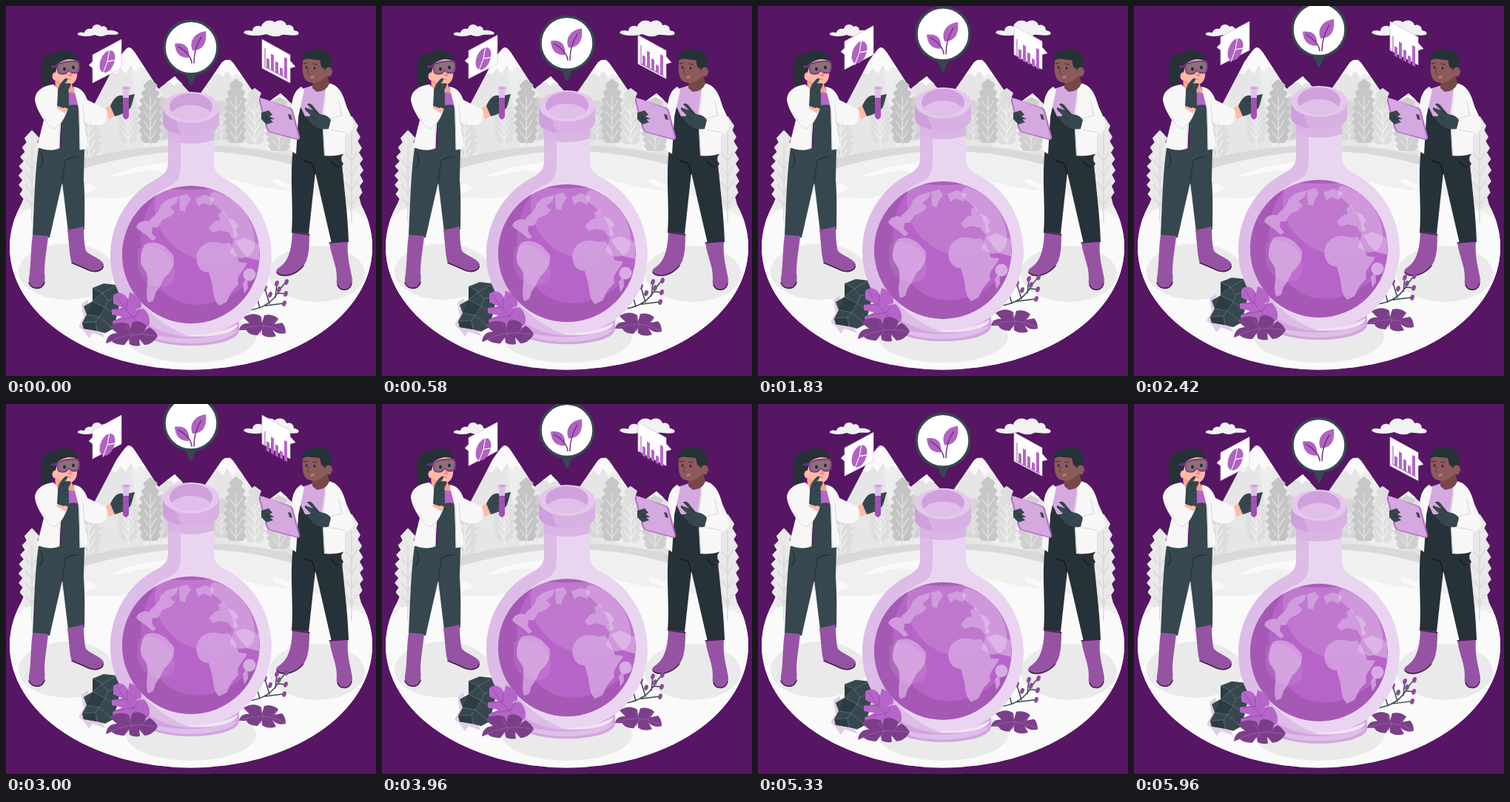
Write an HTML page that moves like this. It is 500 by 500 pixels and loops after 6000 ms.

```html
<!DOCTYPE html>
<html lang="en">
<head>
<meta charset="utf-8">
<title>Green laboratory</title>
<style>
html, body { margin: 0; width: 100%; height: 100%; overflow: hidden; background: #561664; }
svg { display: block; width: 100vw; height: 100vh; }
.round { stroke-linecap: round; stroke-linejoin: round; }
.line { fill: none; stroke-linecap: round; stroke-linejoin: round; }
</style>
</head>
<body>
<svg viewBox="0 0 500 500">
  <defs>
    <clipPath id="ball"><circle cx="250" cy="336" r="93"/></clipPath>
    <clipPath id="mouth"><ellipse cx="250" cy="136" rx="29" ry="18"/></clipPath>
    <clipPath id="floorClip"><ellipse cx="250" cy="326" rx="245" ry="165.500"/></clipPath>
  </defs>

  <g id="clouds" fill="#f2f2f2">
    <path d="M97 39C96 35 102 35 106 36C107 31 112 30 116 31C117 24 126 23 129 28C133 26 137 29 137 33C143 32 151 34 152 37C150 40 141 38 136 39C130 42 124 41 120 39C112 42 101 41 97 39Z"/>
    <path d="M321 36C323 32 329 33 333 34C333 28 340 25 345 28C347 20 357 17 363 22C369 17 378 20 379 26C385 24 389 28 389 33C394 33 398 37 394 39C386 41 379 38 373 39C367 43 358 41 352 38C342 41 326 41 321 36Z"/>
  </g>

  <ellipse cx="250" cy="326" rx="245" ry="165.500" fill="#f1f1f1"/>
  <g id="mountains">
    <path d="M206 210V112L228 95L264 134V210ZM340 210V140L371 118L405 150V210Z" fill="#e3e3e3"/>
    <path d="M84 200L149 76Q163 55 166 56Q170 56 178 69L232 152V200Z" fill="#e6e6e6"/>
    <path d="M168 57Q171 57 178 69L232 152V200H187L180 145L172 110Z" fill="#ededed"/>
    <path d="M240 200L260 122L292 76Q300 69 307 77L356 148L370 200Z" fill="#e6e6e6"/>
    <path d="M302 72L307 77L356 148L370 200H318L307 125Z" fill="#ededed"/>
    <g fill="#fafafa">
      <path d="M142 90L149 76Q163 55 166 56Q170 56 178 69L189 86L180 83L176 90L168 80L162 92L155 84L149 92Z"/>
      <path d="M279 95L292 76Q300 69 307 77L320 96L311 91L306 97L299 87L293 96L287 90Z"/>
      <path d="M216 104L228 95L239 106L232 104L227 108L222 103ZM360 126L371 118L381 127L374 125L370 129L365 125Z"/>
    </g>
  </g>
  <g id="trees"></g>
  <g clip-path="url(#floorClip)">
    <path d="M20 238Q100 196 220 189H288Q390 192 482 240V300H20Z" fill="#d9d9d9"/>
    <path d="M10 262Q90 211 220 197H284Q395 204 490 258V320H10Z" fill="#f0f0f0"/>
    <path d="M-10 290C28 292 20 266 60 262C88 244 118 240 150 226Q180 214 220 211H282Q340 220 392 246C440 262 468 282 510 292V500H35Q25 410 -10 340Z" fill="#fafafa"/>
    <path d="M108 240C130 226 154 233 175 225C193 219 212 224 221 228V242C190 241 180 255 158 258C140 263 112 255 104 263C91 253 145 248 108 240ZM281 211C315 208 370 218 393 229C356 230 346 239 387 248C356 251 330 239 302 234L281 229Z" fill="#f0f0f0"/>
  </g>
  <g fill="#eaeaea">
    <ellipse cx="82" cy="359" rx="65" ry="38"/>
    <ellipse cx="420" cy="362" rx="65" ry="38"/>
    <ellipse cx="250" cy="447" rx="88" ry="35"/>
  </g>
  <g id="sideTrees"></g>

  <g id="leftScientist">
    <path d="M65 64C50 62 46 76 47 92C48 104 49 111 54 117C60 109 61 100 61 88Z" fill="#263238"/>
    <path d="M66 92L67 118L88 133L95 120L88 104Z" fill="#f4a391"/>
    <path d="M72 118L84 116L98 119L100 140H72Z" fill="#b565c8"/>
    <path d="M44 192H106L105 235C107 260 106 285 106 302L84 305L76 238L59 313L36 311C38 270 39 225 44 192Z" fill="#37474f"/>
    <path d="M74 195L76 138C84 133 92 133 97 134L104 197Z" fill="#37474f"/>
    <path class="line" d="M97 204Q86 204 80 209L76 240M47 199Q53 211 45 219" stroke="#263238" stroke-width="1.3"/>
    <path d="M36 309L57 311C55 330 52 345 52 360C54 373 50 382 42 382C33 382 30 376 31 368C34 350 33 330 36 309Z" fill="#9653a3"/>
    <path d="M83 303L105 298C105 312 106 325 108 331C116 339 129 341 132 349C133 357 122 361 112 357L90 348C86 345 86 325 83 303Z" fill="#9653a3"/>
    <path class="line" d="M31 374C34 383 49 385 52 373M89 347L112 357C121 361 131 357 131 352" stroke="#442048" stroke-width="1.6"/>
    <path d="M64 106C48 108 39 116 39 127C41 139 47 147 51 154L42 190C53 196 66 196 72 192L75 148L69 111Z" fill="#f7f7f7"/>
    <path d="M91 109C101 110 107 118 110 127L137 140L135 157C126 164 114 161 105 157L111 189C108 194 103 195 100 194L98 137Z" fill="#f7f7f7"/>
    <path class="line" d="M50 126Q54 145 64 155M73 139L72 192M104 134L106 158M99 135L100 194" stroke="#dcdcdc" stroke-width="1.2"/>
    <path d="M51 120C47 135 52 154 65 166C75 161 79 151 83 141L70 134L64 143Z" fill="#f7f7f7"/>
    <path class="line" d="M51 149C55 160 59 164 65 166Q76 159 82 143" stroke="#d8d8d8"/>
    <path d="M71 133L84 139L80 145L68 138Z" fill="#ffb9a6"/>
    <path d="M59 79C58 64 70 58 82 60C93 62 98 68 98 77L82 82L74 100C64 100 59 91 59 79Z" fill="#263238"/>
    <path d="M70 78Q85 68 97 75L96 94C95 104 88 108 80 106C73 104 68 100 66 93Z" fill="#ffb9a6"/>
    <ellipse cx="67" cy="95" rx="4.500" ry="5.500" fill="#ffb9a6"/>
    <path d="M61 81L71 79L71 83L61 84Z" fill="#6a3177"/>
    <path d="M71 78Q84 73 97 75Q100 79 98 88Q94 92 89 90L85 87L81 91Q74 93 71 90Q68 82 71 78Z" fill="#8f6f7a" stroke="#7d3c8c" stroke-width="2"/>
    <g fill="#263238"><ellipse cx="79" cy="85" rx="2" ry="2.500"/><ellipse cx="91" cy="83" rx="2" ry="2.500"/></g>
    <path class="line" d="M86 88L88 94L84 94M84 99L87 99" stroke="#d56c68" stroke-width="1.2"/>
    <path d="M69 135L70 118C70 109 74 103 80 98C84 96 85 99 79 105L87 105C89 109 82 112 85 119L85 134L78 138Z" fill="#37474f"/>
    <path class="line" d="M74 114L80 105L87 105M79 118L84 114" stroke="#263238"/>
    <path d="M135 138L144 133L149 147L139 153Z" fill="#ffb9a6"/>
    <path d="M141 135C146 123 153 118 160 122L174 119L172 126L169 136C166 143 153 148 147 149Z" fill="#37474f"/>
    <path d="M157 111H168L166 117V150Q162 157 158 150V117Z" fill="#dfbdea"/>
    <path d="M158 124H166V150Q162 156 158 150Z" fill="#a14fb3"/>
    <ellipse cx="162.500" cy="111" rx="6" ry="2.500" fill="#d3a3df" stroke="#eddaf2"/>
    <path class="line" d="M150 130L157 127M151 135L157 134M166 132L170 130" stroke="#263238"/>
  </g>

  <g id="rightScientist">
    <path d="M400 112L419 106L436 108L431 150H395Z" fill="#d4a9df"/>
    <path d="M388 192H452C456 240 462 280 463 319L440 321L418 225L409 308L386 306C389 270 383 235 388 192Z" fill="#263238"/>
    <path d="M395 146L398 136L404 149L425 150L431 141L432 202H391Z" fill="#263238"/>
    <path class="line" d="M403 209L414 213L418 227M440 209Q443 216 449 218" stroke="#11191d" stroke-width="1.4"/>
    <path d="M387 305L410 308C410 325 409 340 404 348C398 359 385 367 375 365C366 365 363 359 367 355C379 348 386 335 387 305Z" fill="#9653a3"/>
    <path d="M437 320L462 318C460 340 466 355 468 370C468 380 462 384 456 384C448 384 446 376 447 368C447 350 440 340 437 320Z" fill="#9653a3"/>
    <path class="line" d="M366 360C372 367 391 365 402 351M448 377C452 386 464 386 467 375M387 306L410 309M437 320L462 318" stroke="#442048" stroke-width="1.4"/>
    <path d="M399 109C388 115 385 130 386 147L384 195L392 200L395 150L403 113Z" fill="#f7f7f7"/>
    <path d="M433 104C448 105 455 116 460 135C465 147 472 158 468 167L459 174L460 198Q447 204 430 202L427 148Z" fill="#f7f7f7"/>
    <path class="line" d="M432 120L428 153L431 202M450 129L454 148L438 152M439 167L460 171M459 174V198" stroke="#d9d9d9" stroke-width="1.2"/>
    <path d="M414 98L433 88L437 105Q432 116 420 116L414 111Z" fill="#754747"/>
    <path d="M402 70C399 84 401 99 408 102C419 107 430 101 434 91L432 72L416 66Z" fill="#8d5a5b"/>
    <path d="M400 74C397 63 411 57 424 58C439 60 443 74 438 84L434 94L430 85L426 82L424 73C414 73 408 69 400 74Z" fill="#263238"/>
    <ellipse cx="436" cy="89" rx="5" ry="6.500" fill="#8d5a5b"/>
    <g fill="#263238"><ellipse cx="406" cy="83" rx="1.300" ry="2"/><ellipse cx="417" cy="84" rx="1.400" ry="2"/></g>
    <path class="line" d="M402 78L407 77M415 78L420 79" stroke="#263238" stroke-width="1.2"/>
    <path class="line" d="M409 84L407 91L411 92" stroke="#693e40"/>
    <path d="M411 96L417 94Q416 98 412 98Z" fill="#d57b7f"/>
    <path d="M344 124Q341 125 342 129L352 166Q353 170 357 171L394 181Q398 181 397 176L388 142Q387 138 383 137Z" fill="#b66ac7"/>
    <path d="M347 125Q343 124 344 129L354 166Q355 169 358 170L392 179Q396 180 395 176L386 143Q385 139 382 138Z" fill="#d4a9df"/>
    <path d="M381 146L385 147L387 154L383 153Z" fill="#37474f"/>
    <path d="M345 144L355 141L360 147L356 149L363 153L357 153L361 157L352 160L345 153Z" fill="#37474f"/>
    <path d="M404 137L415 141L407 133Q410 130 414 134L424 146Q435 147 439 154L436 166Q423 168 414 160L406 150L412 148L404 140Z" fill="#37474f"/>
    <path class="line" d="M415 141L424 147M412 148L419 152M348 148L355 150M348 152L357 153" stroke="#263238"/>
  </g>

  <g id="badges">
    <path d="M242 90H258L252 105Q250 109 248 105Z" fill="#37474f"/>
    <circle cx="250" cy="56" r="36" fill="#fff" stroke="#37474f" stroke-width="3.500"/>
    <path d="M117 66L156 45V84L117 104V84L112 80L117 75Z" fill="#fff" stroke="#d8b4e2" stroke-width=".7"/>
    <path d="M346 45L384 66V74L391 82L384 84V104L346 84Z" fill="#fff" stroke="#d8b4e2" stroke-width=".7"/>
  </g>
  <g id="symbols">
    <path d="M228 51C240 49 249 54 247 70C234 70 229 63 228 51ZM270 34C272 50 266 60 252 60C247 47 255 36 270 34Z" fill="#b063c1"/>
    <path class="line" d="M233 55Q250 65 251 77M264 42Q254 57 254 77" stroke="#71347f" stroke-width="1.5"/>
    <g transform="matrix(1 -.53 0 1 137 75)">
      <ellipse rx="10.500" ry="14" fill="#b063c1"/>
      <path class="line" d="M0 0L3 -15M0 0L11 4M0 0L-6 13" stroke="#fff" stroke-width="1.2"/>
    </g>
    <g transform="matrix(1 .53 0 1 346 45)">
      <path class="line" d="M4 10V35H35" stroke="#6b2d7a" stroke-width=".8"/>
      <path d="M6 35V22H10V35ZM12 35V13H16V35ZM18 35V20H22V35ZM24 35V25H28V35ZM30 35V8H34V35Z" fill="#b565c8"/>
    </g>
  </g>

  <g id="floating">
    <g id="branch">
      <path class="line" d="M329 411Q358 407 370 383L379 372M364 394L366 376M356 402L350 382M350 405L374 402M343 408L339 394M367 388L379 389" stroke="#37474f" stroke-width="1.500"/>
      <g id="buds" fill="#8c4a99"></g>
    </g>
    <path d="M102 403L110 397L116 414L134 448L117 442L112 449L105 439L98 433L105 421Z" fill="#dfcde6"/>
    <g id="rock">
      <path d="M117 381L132 375L150 377L156 392L150 418L145 436L134 442L123 439L105 436L103 428L109 417L105 406L117 399Z" fill="#37474f"/>
      <path d="M117 381L130 388L117 399ZM117 399L134 408L126 420L109 417ZM103 428L121 427L123 439L105 436Z" fill="#2d3b43"/>
      <path class="line" d="M117 381L130 388L150 377M130 388L138 398L156 392M130 388L117 399L134 408L138 398M109 417L126 420L134 408L150 418M103 428L121 427L126 420L132 425L145 436M121 427L123 439" stroke="#72828a" stroke-width=".6"/>
    </g>

    <g id="flask">
      <path d="M219 162V212C219 227 208 231 196 238C164 257 141 295 141 338C141 374 159 407 185 426V438C185 451 216 459 250 459S315 451 315 438V426C341 407 359 374 359 338C359 295 336 257 304 238C292 231 281 227 281 212V162Z" fill="#e9d5ef"/>
      <path d="M219 162V212C219 227 208 231 196 238C164 257 141 295 141 338C141 400 190 447 250 447C205 432 160 390 158 338C158 295 190 256 224 242C233 237 236 229 236 214V162Z" fill="#ddbce7"/>
      <path d="M185 426Q217 447 250 447T315 426V438C315 451 284 459 250 459S185 451 185 438Z" fill="#d3a4df"/>
      <path d="M188 441Q250 459 313 438Q302 454 250 456Q204 455 188 441Z" fill="#dfbfe9"/>
      <path d="M245 444Q282 446 313 430Q312 442 276 446Q257 448 245 444Z" fill="#f2e4f6"/>
      <path d="M219 169H281V181Q250 191 219 181Z" fill="#d9b4e4"/>
      <path d="M212 137V157C212 169 229 175 250 175S288 169 288 157V137Z" fill="#d9b0e3"/>
      <path d="M236 173Q212 169 212 157V137L228 151Z" fill="#d09fdd"/>
      <ellipse cx="250" cy="137" rx="38" ry="21" fill="#e4c8ec"/>
      <ellipse cx="250" cy="136" rx="29" ry="18" fill="#d0a0dc"/>
      <ellipse cx="250" cy="151" rx="29" ry="17" fill="#e0bfe9" clip-path="url(#mouth)"/>
    </g>

    <g id="globe" clip-path="url(#ball)">
      <circle cx="250" cy="336" r="93" fill="#b764c8"/>
      <path d="M157 243H215C175 278 170 345 210 384C244 417 297 408 342 360V430H157Z" fill="#a559b5"/>
      <ellipse cx="287" cy="271" rx="86" ry="75" fill="#fff" opacity=".13"/>
      <ellipse cx="250" cy="239" rx="60" ry="9" fill="#9e50af" opacity=".65"/>
      <g fill="#d3a0df" opacity=".9">
        <path d="M176 299C178 291 188 289 193 291C197 284 207 281 209 269L217 262L233 257L231 265L222 272L228 278L222 284L211 289L205 299L198 299L197 307L203 314L198 317L189 309L180 303Z"/>
        <path d="M188 322C201 316 209 322 216 326L226 337C230 349 222 361 214 367L207 381L202 388L199 398L192 401C187 388 194 374 190 361L183 350C180 340 184 329 188 322Z"/>
        <path d="M234 257L245 254L250 261L244 270L242 278L235 276ZM256 260L269 255L282 260L277 270L266 266L260 271ZM274 300L282 291L289 289L287 281L294 277L299 286L309 290L314 298L310 303L314 311L306 314L301 306L289 303L279 306Z"/>
        <path d="M259 332C265 319 281 316 291 321L302 320L309 331L315 346L326 347C320 361 311 363 314 376L305 386L298 400L288 405C279 397 281 386 278 374L274 360C261 361 254 345 259 332Z"/>
        <path d="M309 318L323 313L342 322V344L326 340L318 331ZM320 375L326 366L327 381L322 389Z"/>
      </g>
      <path d="M283 251C312 260 333 284 336 314C339 342 318 347 302 333C315 309 306 286 278 266C274 259 276 250 283 251Z" fill="#fff" opacity=".24"/>
      <path d="M178 329C209 312 241 352 223 376C202 387 182 373 178 353Z" fill="#fff" opacity=".09"/>
      <circle cx="329" cy="363" r="8.500" fill="#e2bdeb" opacity=".8"/>
    </g>

    <g id="foliage">
      <path d="M145 391C153 384 162 389 165 397L167 387C177 390 184 398 183 406L175 411L186 409C193 415 196 426 193 432L182 438H158L145 432L144 426L157 420L143 417V410L157 408L145 402Z" fill="#b565c8"/>
      <path class="line" d="M149 391Q162 413 183 433M164 396L163 409M182 407L174 420M147 410L163 409M148 425L174 420" stroke="#954ba7" stroke-width=".9"/>
      <path d="M135 456C136 447 141 442 150 442L140 434C146 427 158 426 166 430L168 437L171 427C179 425 187 428 190 433L187 439L194 434C199 437 203 441 205 446C200 454 194 458 187 458L180 450L181 459C176 460 170 459 167 457L166 450L160 458C153 458 145 456 143 453Z" fill="#7b3f89"/>
      <path class="line" d="M137 455Q166 438 203 446M162 432L170 444M189 437L185 443M166 452L171 444" stroke="#a35cb1" stroke-width=".8"/>
      <path d="M315 438C316 432 321 428 329 429L321 421C329 415 339 415 345 420L346 428L349 418C357 416 365 419 368 423L363 430L373 428C377 432 378 437 378 442C371 444 364 442 360 437L365 446C357 449 349 447 346 444L346 437L340 445C332 445 326 442 325 438Z" fill="#7b3f89"/>
      <path class="line" d="M318 437Q347 425 376 440M342 422L348 432M365 424L360 432M344 442L348 432" stroke="#a35cb1" stroke-width=".8"/>
    </g>
  </g>
</svg>
<script>
const byId = id => document.getElementById(id);

// Feathered tree: branch tips point up, with a notch below each one.
function tree(x, top, base, half, color, trunk) {
  const tiers = 8, height = base - top - 22;
  const edge = side => Array.from({ length: tiers }, (_, i) => {
    const y = top + height * (i + 1) / tiers;
    const width = half * Math.sin(Math.PI * (.1 + .62 * (i + 1) / tiers));
    return [`${x + side * width},${y - 3}`, `${x + side * width * .68},${y + 3}`];
  });
  const left = edge(-1).flat();
  const right = edge(1).reverse().map(pair => pair.reverse()).flat();
  let twigs = "";
  for (let i = 2; i < 6; i++) {
    const y = top + height * (i + 1) / 6;
    twigs += `M${x - half * .5} ${y - 11}L${x} ${y}L${x + half * .5} ${y - 13}`;
  }
  return `<polygon class="round" points="${x},${top} ${left.join(" ")} ${right.join(" ")}" fill="${color}" stroke="${color}" stroke-width="2"/>
    <path class="line" d="M${x} ${top + 22}V${base}${twigs}" stroke="${trunk}" stroke-width="1.5"/>`;
}

byId("trees").innerHTML = [
  [112, 134, 229, 16, "#dddddd", "#f0f0f0"],
  [165, 126, 203, 14, "#dedede", "#f0f0f0"],
  [210, 123, 199, 12, "#d1d1d1", "#e2e2e2"],
  [195, 100, 203, 16, "#c4c4c4", "#dedede"],
  [291, 128, 199, 14, "#d7d7d7", "#e6e6e6"],
  [311, 99, 203, 16, "#c7c7c7", "#dedede"],
  [336, 112, 205, 15, "#dedede", "#f0f0f0"],
  [369, 124, 214, 18, "#cfcfcf", "#e0e0e0"]
].map(args => tree(...args)).join("");

byId("sideTrees").innerHTML =
  tree(35, 169, 292, 17, "#e9e9e9", "#d8d8d8") +
  tree(467, 150, 292, 15, "#e9e9e9", "#d8d8d8");

byId("buds").innerHTML = [
  [379, 373], [366, 375], [350, 381], [339, 394], [376, 402], [378, 389], [357, 390], [369, 383]
].map(([x, y]) => `<ellipse cx="${x}" cy="${y}" rx="2.7" ry="4" transform="rotate(18 ${x} ${y})"/>`).join("");

const lifts = [[byId("floating"), 10], [byId("badges"), 30], [byId("symbols"), 20]];

function draw(now) {
  const phase = now % 6000 / 3000;
  const rise = 1 - Math.abs(phase - 1);
  for (const [layer, height] of lifts) {
    layer.setAttribute("transform", `translate(0 ${-height * rise})`);
  }
  requestAnimationFrame(draw);
}

draw(0);
</script>
</body>
</html>
```
